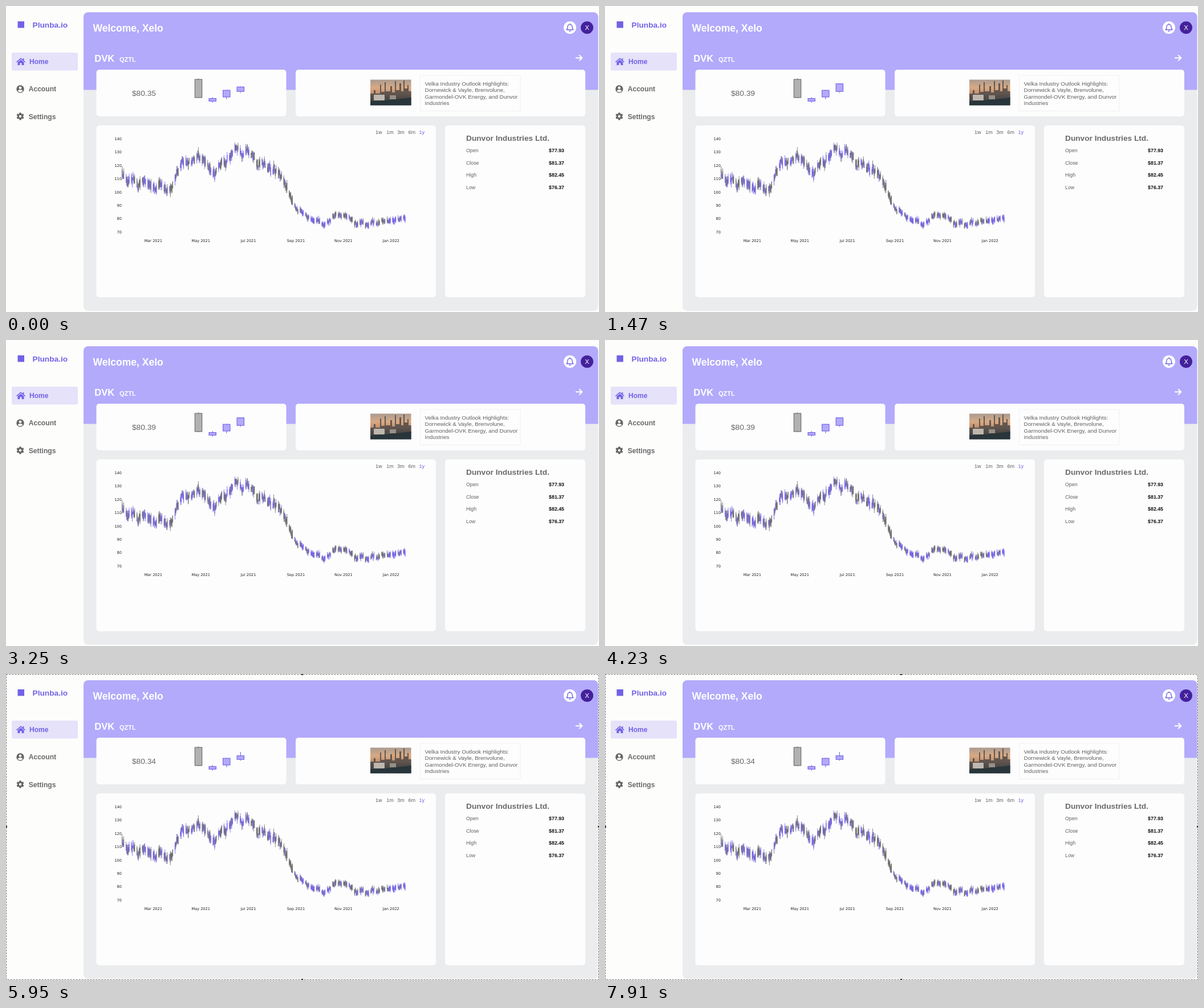
Write an HTML page that moves like this. It is 1040x538 px and loops after 8 s.

```html
<!DOCTYPE html>
<html lang="en">
<head>
<meta charset="utf-8">
<title>Stock dashboard</title>
<style>
  html, body { margin: 0; width: 100%; height: 100%; overflow: hidden; background: #fdfdfc; }
  svg { display: block; width: 100vw; height: 100vh; font-family: "Liberation Sans", Arial, sans-serif; }
  .bold { font-weight: 700; }
  .axis { font: 6.6px "DejaVu Sans", Verdana, sans-serif; fill: #222; }
</style>
</head>
<body>
<svg id="stage" viewBox="0 0 1040 538">
  <defs>
    <clipPath id="panel"><rect x="136" y="11" width="902.5" height="525" rx="8"/></clipPath>
    <clipPath id="photo"><rect x="639" y="129.5" width="71.5" height="45"/></clipPath>
    <linearGradient id="sky" x2="0" y2="1">
      <stop offset="0" stop-color="#a99a91"/>
      <stop offset=".32" stop-color="#d8aa84"/>
      <stop offset=".55" stop-color="#c18e6c"/>
      <stop offset=".68" stop-color="#574f49"/>
      <stop offset="1" stop-color="#25343a"/>
    </linearGradient>
  </defs>

  <rect width="1040" height="538" fill="#fdfdfc"/>
  <g clip-path="url(#panel)">
    <rect x="136" y="11" width="903" height="525" fill="#ebecee"/>
    <rect x="136" y="11" width="903" height="136.5" fill="#b3aafb"/>
  </g>
  <g fill="#fdfdfd">
    <rect x="158.5" y="112" width="333" height="82" rx="5"/>
    <rect x="508" y="112" width="508" height="82" rx="5"/>
    <rect x="158.5" y="210" width="595.5" height="302" rx="5"/>
    <rect x="770" y="210" width="246" height="302" rx="5"/>
  </g>

  <!-- Sidebar -->
  <rect x="10" y="82" width="116" height="31.5" rx="3" fill="#e5e2f9"/>
  <rect x="20.5" y="27" width="11.5" height="11.5" fill="#7262e6"/>
  <g fill="#7262e6">
    <path d="M26 91.2 18 98.1 19 99.2 26 93.2 33 99.2 34 98.1 31.4 95.8V92H29.5V94.2Z"/>
    <path d="M26 94.4 20.5 99.1V104H24.4V100.2H27.6V104H31.5V99.1Z"/>
  </g>
  <circle cx="25" cy="146" r="6.7" fill="#666"/>
  <circle cx="25" cy="143.8" r="2.4" fill="#fdfdfc"/>
  <path d="M20.7 149.8Q21.3 147.2 23.4 147.2H26.6Q28.7 147.2 29.3 149.8Q25 153.2 20.7 149.8Z" fill="#fdfdfc"/>
  <g id="gear" fill="#666"><circle cx="25" cy="194" r="5"/></g>
  <circle cx="25" cy="194" r="2.2" fill="#fdfdfc"/>

  <!-- Header icons -->
  <circle cx="989" cy="38" r="11" fill="#fff"/>
  <g fill="none" stroke="#7262e6" stroke-width="1.4" stroke-linejoin="round">
    <path d="M983.2 41.8Q985 40 985 36.6Q985 32.7 989 32.4Q993 32.7 993 36.6Q993 40 994.8 41.8Z"/>
    <path d="M989 30.7V32.5M987.5 43.6Q989 45.4 990.5 43.6"/>
  </g>
  <circle cx="1019" cy="38" r="11" fill="#43219b"/>
  <path d="M999 91.3H1010M1005.3 86.3 1010.3 91.3 1005.3 96.3" fill="none" stroke="#fff" stroke-width="2"/>

  <!-- News -->
  <g clip-path="url(#photo)">
    <rect x="639" y="129" width="72" height="46" fill="url(#sky)"/>
    <path d="M639 154H645V148H648V154H656V138H658V151H664V134H666V150H674V141H677V152H682V132H684V148H690V136H693V150H697V131H699V145H704V139H706V150H711V164H639Z" fill="#514b48" opacity=".85"/>
    <rect x="645" y="156" width="19" height="10" rx="1" fill="#bdb7af"/>
    <rect x="673" y="157" width="11" height="7" fill="#958f87"/>
    <path d="M639 168 665 166 711 161V175H639Z" fill="#28353a"/>
  </g>
  <rect x="726.5" y="122" width="175.5" height="62.5" fill="none" stroke="#f1f0f8"/>

  <g id="candles"></g>
  <g id="lastCandle"></g>
  <g id="chart" fill="none"></g>
  <g id="labels"></g>
  <g id="outline">
    <rect x=".5" y=".5" width="1039" height="537" fill="none" stroke="#707070" stroke-dasharray="3 2"/>
    <path d="M518 0h3v2h-3zM518 536h3v2h-3zM0 267h2v3h-2zM1038 267h2v3h-2z" fill="#333"/>
  </g>
</svg>
<script>
const SVG = "http://www.w3.org/2000/svg";
const LOOP = 8000;
const GREY = "#696969", PURPLE = "#7262e6", LIGHT = "#b3aafa";
const byId = id => document.getElementById(id);

function add(parent, tag, attrs) {
  const node = document.createElementNS(SVG, tag);
  for (const key in attrs) node.setAttribute(key, attrs[key]);
  return parent.appendChild(node);
}

function label(text, x, y, size, fill, attrs = {}) {
  const node = add(byId("labels"), "text", { x, y, "font-size": size, fill, ...attrs });
  node.textContent = text;
  return node;
}

const bold = { class: "bold" };
const end = { "text-anchor": "end" };
const middle = { "text-anchor": "middle" };

function drawLabels() {
  label("Plunba.io", 46.5, 38, 13.7, PURPLE, bold);
  label("Home", 41, 102.4, 12.1, PURPLE, bold);
  label("Account", 39.7, 150.4, 12.1, GREY, bold);
  label("Settings", 39.7, 198.6, 12.1, GREY, bold);
  label("Welcome, Xelo", 152.5, 45, 17.5, "#fff", bold);
  label("X", 1019, 42.2, 11.5, "#fff", middle);
  label("DVK", 155.3, 97.6, 16.5, "#fff", bold);
  label("QZTL", 199, 98.3, 11, "#fff", bold);

  ["Velka Industry Outlook Highlights:", "Dornewick & Vayle, Brenvolune,",
   "Garmondel-OVK Energy, and Dunvor", "Industries"]
    .forEach((line, i) => label(line, 734.5, 139.5 + i * 11.5, 9.88, "#606060"));

  ["1w", "1m", "3m", "6m", "1y"].forEach((span, i) =>
    label(span, 648 + i * 19.15, 225, 9, i === 4 ? PURPLE : "#606060"));

  label("Dunvor Industries Ltd.", 807, 237, 13.7, GREY, bold);
  Object.entries({ Open: "$77.93", Close: "$81.37", High: "$82.45", Low: "$76.37" })
    .forEach(([name, value], i) => {
      const y = 256.7 + i * 21.85;
      label(name, 807, y, 8.8, "#606060");
      label(value, 979, y, 8.8, "#111", { ...bold, ...end });
    });

  for (let value = 70; value <= 140; value += 10)
    label(value, 203, 399.8 - (value - 70) * 2.343, 6.6, "#222", { class: "axis", ...end });
  ["Mar 2021", "May 2021", "Jul 2021", "Sep 2021", "Nov 2021", "Jan 2022"]
    .forEach((month, i) => label(month, 258.3 + i * 83.4, 414.5, 6.6, "#222", { class: "axis", ...middle }));
}

function drawGear() {
  for (let angle = 0; angle < 360; angle += 60)
    add(byId("gear"), "rect", { x: 23.2, y: 187.4, width: 3.6, height: 4, rx: .7,
      transform: `rotate(${angle} 25 194)` });
}

function candle(parent, x, top, bottom, high, low, stroke = PURPLE, fill = LIGHT) {
  const style = { stroke, fill, "stroke-width": 1.1 };
  return [
    add(parent, "path", { d: `M${x} ${high}V${low}`, ...style }),
    add(parent, "rect", { x: x - 6.2, y: top, width: 12.4, height: bottom - top, ...style })
  ];
}

function seeded(seed) {
  return () => (seed = (seed * 16807) % 2147483647) / 2147483647;
}

// Mid-week height of the price curve, one value per week.
const weeks = [298, 308, 304, 317, 305, 312, 322, 314, 324, 322, 296, 276, 277, 272, 263, 268, 284, 296,
  276, 275, 264, 246, 262, 252, 262, 281, 276, 286, 288, 297, 313, 338, 358, 362, 372, 377, 377, 384,
  380, 368, 368, 367, 374, 385, 380, 386, 379, 382, 376, 378, 378, 374, 373];

function priceY(day) {
  const week = Math.min(weeks.length - 1, Math.max(0, (day + 40) / 7));
  const i = Math.min(weeks.length - 2, Math.floor(week));
  return weeks[i] + (weeks[i + 1] - weeks[i]) * (week - i);
}

function drawChart() {
  const random = seeded(2021);
  const paths = { [GREY]: ["", ""], [PURPLE]: ["", ""] };
  for (let day = -40; day <= 324; day++) {
    const weekday = (day + 70) % 7;
    if (weekday > 4) continue;
    const x = (258.3 + day * 1.363).toFixed(2);
    const calm = day > 180;
    const y = priceY(day) + (random() - .5) * (calm ? 5 : 8);
    const body = (calm ? 2.5 : 3.5) + random() * (calm ? 2 : 4);
    const reach = () => body + random() * (calm ? 3.5 : 6);
    const falling = priceY(day + 2) - priceY(day - 2) > 6;
    const color = random() < (falling ? .8 : .48) ? GREY : PURPLE;
    const line = (up, down) => `M${x} ${(y - up).toFixed(1)}V${(y + down).toFixed(1)}`;
    paths[color][0] += line(reach(), reach());
    paths[color][1] += line(body, body);
  }
  for (const color in paths)
    paths[color].forEach((d, i) => add(byId("chart"), "path",
      { d, stroke: color, "stroke-width": i ? 1.25 : .8 }));
}

drawLabels();
drawGear();
drawChart();
candle(byId("candles"), 337.5, 129, 161, 127.5, 162, "#666", "#b1b1b1");
candle(byId("candles"), 362.2, 162.6, 167.3, 160.3, 170);
candle(byId("candles"), 386.8, 148.2, 160, 147.5, 164);
const [wick, body] = candle(byId("lastCandle"), 411.3, 142.3, 150.2, 141.5, 152.5);
const price = label("", 221, 158, 13.7, "#686868");

const quotes = [
  { from: 0, price: "$80.35", top: 142.3, high: 141.5 },
  { from: 870, price: "$80.39", top: 136.7, high: 136.2 },
  { from: 5490, price: "$80.34", top: 143.7, high: 137 }
];

function update(time) {
  const quote = quotes.findLast(q => q.from <= time);
  price.textContent = quote.price;
  body.setAttribute("y", quote.top);
  body.setAttribute("height", 150.2 - quote.top);
  wick.setAttribute("d", `M411.3 ${quote.high}V152.5`);
  byId("outline").setAttribute("visibility", time >= 5490 ? "visible" : "hidden");
}

const start = performance.now();
function tick() {
  update((performance.now() - start) % LOOP);
  requestAnimationFrame(tick);
}
tick();
</script>
</body>
</html>
```
